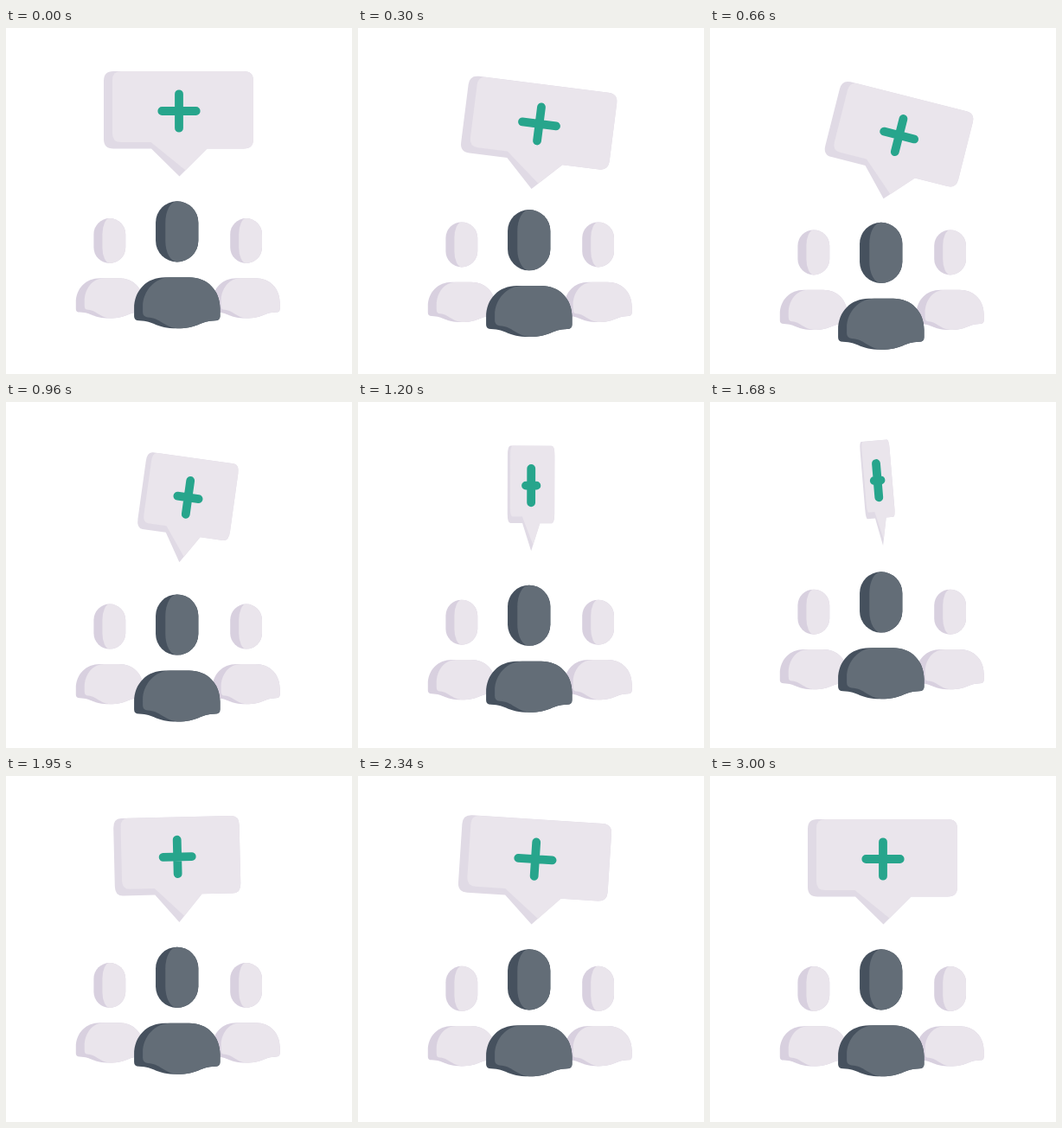
Write an HTML page with a canvas that moves like this. It is 400 px wide and 400 px high and loops after 5.09 s.

```html
<!DOCTYPE html>
<html lang="en">
<head>
<meta charset="utf-8">
<title>Team bubble</title>
<style>
  html, body { margin: 0; width: 100%; height: 100%; overflow: hidden; background: #fff; }
  canvas { display: block; width: 100vw; height: 100vh; object-fit: contain; }
</style>
</head>
<body>
<canvas id="stage" width="400" height="400"></canvas>
<script>
const LOOP = 5090, STEP = 30, SIZE = 400;
const canvas = document.getElementById('stage');
const ctx = canvas.getContext('2d');
const ratio = Math.max(1, window.devicePixelRatio || 1);
canvas.width = canvas.height = SIZE * ratio;

const PALE = { light: '#eae5ec', shade: '#d8d0df' };
const DARK = { light: '#636d77', shade: '#46515e' };
const BUBBLE = { light: '#eae5ec', shade: '#e0dae5' };
const GREEN = '#27a58c';
const RAD = Math.PI / 180;

// Turning points [ms, value]; each swing between them is a sine ease.
const mainDrop = swing([0, 0], [690, 24.6], [800, 24.6], [1640, -4], [2400, 0]);
const sideDrop = swing([0, 0], [810, 14.6], [1840, -4.4], [2420, 0]);
const bubbleDrop = swing([0, 0], [570, 26.5], [1480, -6.5], [2310, 0]);
const bubbleTilt = swing([0, 0], [600, 14.4], [1530, -5.4], [2460, 4.1], [2970, 0]);
const bubbleTurn = swing([170, 0], [1560, 85], [2240, 0]);

function swing(...points) {
  return t => {
    const next = points.findIndex(([time]) => time > t);
    if (next === 0) return points[0][1];
    if (next < 0) return points[points.length - 1][1];
    const [t0, v0] = points[next - 1], [t1, v1] = points[next];
    const p = (1 - Math.cos(Math.PI * (t - t0) / (t1 - t0))) / 2;
    return v0 + (v1 - v0) * p;
  };
}

function fill(color, trace) {
  ctx.beginPath();
  trace();
  ctx.closePath();
  ctx.fillStyle = color;
  ctx.fill();
}

function head(cx, y, w, h, inset, colors) {
  const r = w / 2;
  const capsule = leftRadius => () => {
    ctx.arc(cx, y + r, r, -Math.PI / 2, 0);
    ctx.arc(cx, y + h - r, r, 0, Math.PI / 2);
    ctx.ellipse(cx, y + h - r, leftRadius, r, 0, Math.PI / 2, Math.PI);
    ctx.ellipse(cx, y + r, leftRadius, r, 0, Math.PI, Math.PI * 1.5);
  };
  fill(colors.shade, capsule(r));
  fill(colors.light, capsule(r - inset));
}

function body(cx, y, scale, inset, colors) {
  const half = 49.7, left = inset / scale - half;
  ctx.save();
  ctx.translate(cx, y);
  ctx.scale(scale, scale);
  const rightSide = () => {
    ctx.lineTo(14, 0);
    ctx.bezierCurveTo(35, 0, half, 15, half, 36);
    ctx.lineTo(half, 45);
    ctx.quadraticCurveTo(half, 50, 44, 50);
    ctx.bezierCurveTo(26, 50.5, 25, 59, 0, 59);
  };
  fill(colors.shade, () => {
    ctx.moveTo(-14, 0);
    rightSide();
    ctx.bezierCurveTo(-25, 59, -26, 50.5, -44, 50);
    ctx.quadraticCurveTo(-half, 50, -half, 45);
    ctx.lineTo(-half, 36);
    ctx.bezierCurveTo(-half, 15, -35, 0, -14, 0);
  });
  fill(colors.light, () => {
    ctx.moveTo(-8, 0);
    rightSide();
    ctx.bezierCurveTo(-16, 57, -19, 47, -34, 46.2);
    ctx.quadraticCurveTo(left, 45.5, left, 40);
    ctx.lineTo(left, 34);
    ctx.bezierCurveTo(left, 15, -25, 0, -8, 0);
  });
  ctx.restore();
}

// The left part of a speech bubble whose tip is at the origin, closed by its right part.
function bubbleShape(left, bottom, radius, tipX) {
  const top = -122, right = 86, low = -32.5, r = 11;
  ctx.moveTo(left + radius, top);
  ctx.lineTo(right - r, top);
  ctx.quadraticCurveTo(right, top, right, top + r);
  ctx.lineTo(right, low - r);
  ctx.quadraticCurveTo(right, low, right - r, low);
  ctx.lineTo(-low, low);
  ctx.lineTo(tipX, -tipX);
  ctx.lineTo(tipX + bottom, bottom);
  ctx.lineTo(left + radius, bottom);
  ctx.quadraticCurveTo(left, bottom, left, bottom - radius);
  ctx.lineTo(left, top + radius);
  ctx.quadraticCurveTo(left, top, left + radius, top);
}

// Turning narrows only the path, so the plus keeps its stroke weight.
function bubble(y, tilt, turn) {
  const width = Math.cos(turn * RAD), arm = 19.7;
  ctx.save();
  ctx.translate(200, y);
  ctx.rotate(tilt * RAD);
  ctx.save();
  ctx.scale(width, 1);
  fill(BUBBLE.shade, () => bubbleShape(-87, -32.5, 11, 0.5));
  fill(BUBBLE.light, () => bubbleShape(-77, -40, 10, 7.5));
  ctx.restore();

  ctx.translate(0, -76);
  ctx.beginPath();
  ctx.moveTo(-arm * width, 0);
  ctx.lineTo(arm * width, 0);
  ctx.moveTo(0, -arm);
  ctx.lineTo(0, arm);
  ctx.strokeStyle = GREEN;
  ctx.lineWidth = 9.8;
  ctx.lineCap = 'round';
  ctx.stroke();
  ctx.restore();
}

function draw(time) {
  const t = Math.floor((time % LOOP) / STEP) * STEP;
  ctx.setTransform(ratio, 0, 0, ratio, 0, 0);
  ctx.fillStyle = '#fff';
  ctx.fillRect(0, 0, SIZE, SIZE);

  const side = sideDrop(t), main = mainDrop(t);
  for (const x of [119.8, 277.6]) {
    head(x, 220 + side, 36.8, 52, 10, PALE);
    body(x, 289.3 + side, 0.785, 10, PALE);
  }
  head(197.7, 200.3 + main, 49.3, 70.2, 11.2, DARK);
  body(197.8, 288.3 + main, 1, 10, DARK);
  bubble(172 + bubbleDrop(t), bubbleTilt(t), bubbleTurn(t));
}

const start = performance.now();
function tick() {
  draw(performance.now() - start);
  requestAnimationFrame(tick);
}
tick();
</script>
</body>
</html>
```
